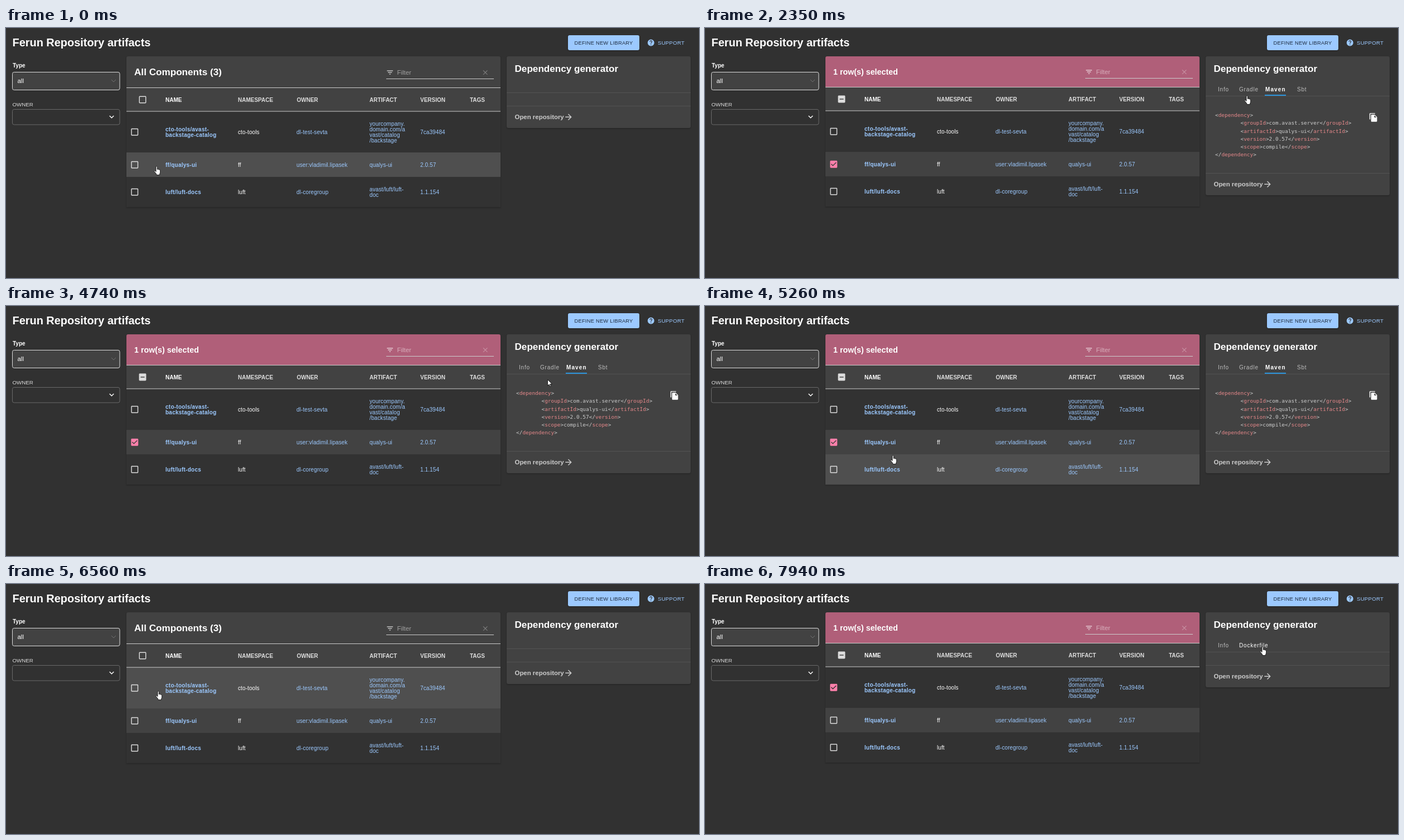
An HTML page for the animation above (8 s loop, 1243x450 px).

```html
<!DOCTYPE html>
<html lang="en">
<head>
<meta charset="utf-8">
<title>Repository artifacts</title>
<style>
  html, body { margin: 0; width: 100%; height: 100%; overflow: hidden; background: #313131; }
  svg { display: block; width: 1243px; height: 450px; }
  text { font: 10px "Liberation Sans", Arial, sans-serif; fill: #fff; white-space: pre; }
  .b { font-weight: 700; }
  .title { font-size: 20px; font-weight: 700; letter-spacing: -.04px; }
  .heading { font-size: 17.14px; font-weight: 700; }
  .selected { font-size: 14.29px; font-weight: 700; }
  .field { font-size: 11.43px; }
  .owner { font-size: 9.7px; fill: #ddd; }
  .button { font-size: 9.29px; letter-spacing: .26px; fill: #1d2b3c; }
  .support { font-size: 9.6px; letter-spacing: .26px; fill: #9cc9ff; }
  .head { font-weight: 700; fill: #ddd; }
  .cell { letter-spacing: .1px; }
  .link { letter-spacing: .1px; fill: #9cc9ff; }
  .name { letter-spacing: .25px; font-weight: 700; fill: #9cc9ff; }
  .tab { letter-spacing: .8px; fill: #bdbdbd; }
  .tab.hot { fill: #fff; }
  .tab.on { letter-spacing: 1.1px; font-weight: 700; fill: #fff; }
  .repo { font-size: 11.43px; font-weight: 700; fill: #ccc; }
  .code { font: 9.45px "DejaVu Sans Mono", monospace; fill: #ccc; }
  .tag { fill: #e5888a; }
  .str { fill: #7ec699; }
  .card { filter: drop-shadow(0 1px 1px rgba(0, 0, 0, .3)); }
</style>
</head>
<body>
<svg id="stage" viewBox="0 0 1243 450"></svg>
<script>
const LOOP = 8000;
const BOX = 'M19 3H5c-1.1 0-2 .9-2 2v14c0 1.1.9 2 2 2h14c1.1 0 2-.9 2-2V5c0-1.1-.9-2-2-2z';
const ICON = {
  empty: BOX + 'M19 5v14H5V5z',
  some: BOX + 'M17 13H7v-2h10z',
  checked: BOX + 'M10 17l-5-5 1.4-1.4L10 14.2l7.6-7.6L19 8z',
  filter: 'M10 18h4v-2h-4zM3 6v2h18V6zm3 7h12v-2H6z',
  clear: 'M19 6.4L17.6 5 12 10.6 6.4 5 5 6.4 10.6 12 5 17.6 6.4 19 12 13.4 17.6 19 19 17.6 13.4 12z',
  arrow: 'M12 4l-1.4 1.4L16.2 11H4v2h12.2l-5.6 5.6L12 20l8-8z',
  copy: 'M16 1H4c-1.1 0-2 .9-2 2v14h2V3h12zm-1 4l6 6v10c0 1.1-.9 2-2 2H8c-1.1 0-2-.9-2-2V7c0-1.1.9-2 2-2zm-1 7h5.5L14 6.5z',
  expand: 'M16.6 8.6L12 13.2 7.4 8.6 6 10l6 6 6-6z',
  help: 'M12 2a10 10 0 1 0 0 20a10 10 0 1 0 0-20zM13 19h-2v-2h2zm2.1-7.7l-.9.9C13.5 12.9 13 13.5 13 15h-2v-.5c0-1.1.5-2.1 1.2-2.8l1.2-1.3c.4-.4.6-.9.6-1.4a2 2 0 0 0-4 0H8a4 4 0 0 1 8 0c0 .9-.4 1.7-.9 2.3z'
};
const POINTER = {
  hand: 'M3 9.5V1a1.2 1.2 0 0 1 2.4 0V5.5q1-.9 2 .2q1-.5 1.7.5q1.5-.3 1.5 1.3V10.5q0 1.8-1 3V15.5H3.8V13.8L0 9.3q-.6-1.2.6-1.6q1 0 2.4 1.8Z',
  arrow: 'M.5.5V11.5L3.1 9.1L4.9 13.1L6.5 12.4L4.8 8.5H8.5Z'
};

const COLUMNS = [['NAME', 286], ['NAMESPACE', 416], ['OWNER', 521.5], ['ARTIFACT', 652], ['VERSION', 743], ['TAGS', 832]];
const ROWS = [
  { top: 150, h: 74, fill: '#323232', name: ['cto-tools/avast-', 'backstage-catalog'], space: 'cto-tools', owner: 'dl-test-sevta',
    artifact: ['yourcompany.', 'domain.com/a', 'vast/catalog', '/backstage'], version: '7ca39484' },
  { top: 224, h: 44, fill: '#424242', name: ['ff/qualys-ui'], space: 'ff', owner: 'user:vladimil.lipasek',
    artifact: ['qualys-ui'], version: '2.0.57' },
  { top: 268, h: 54.6, fill: '#323232', name: ['luft/luft-docs'], space: 'luft', owner: 'dl-coregroup',
    artifact: ['avast/luft/luft-', 'doc'], version: '1.1.154' }
];
const MAVEN = ['<dependency>', '        <groupId>com.avast.server</groupId>', '        <artifactId>qualys-ui</artifactId>',
  '        <version>2.0.57</version>', '        <scope>compile</scope>', '</dependency>'];
const GRADLE = ['compile "com.avast.server:qualys-ui:2.0.57"'];
const TABS = {
  library: [['Info', 920], ['Gradle', 958], ['Maven', 1005], ['Sbt', 1062]],
  image: [['Info', 920], ['Dockerfile', 958]]
};

// Time, pointer position, then whatever else changes at that moment.
const STEPS = [
  [0, 266, 249, { pointer: 'hand', hover: 1, picked: -1, tabs: '', tab: '', hot: '', bar: 0 }],
  [530, 266, 249, { picked: 1 }],
  [660, 266, 249, { tabs: 'library', tab: 'Maven', bar: 1004 }],
  [790, 268, 250],
  [920, 330, 258],
  [1050, 466, 270],
  [1180, 790, 307, { hover: 2 }],
  [1310, 1008, 330, { hover: -1, pointer: 'arrow' }],
  [1440, 1017, 346],
  [1570, 1018, 345],
  [1700, 1015, 330],
  [1830, 1008, 300],
  [1960, 996, 260],
  [2090, 982, 208],
  [2220, 971, 163],
  [2350, 968, 122, { pointer: 'hand' }],
  [2480, 966, 113, { hot: 'Gradle' }],
  [2610, 966, 113, { tab: 'Gradle', bar: 980 }],
  [2740, 966, 113, { bar: 957 }],
  [3400, 976, 112],
  [3530, 1000, 111, { hot: '' }],
  [3660, 1010, 111, { hot: 'Maven' }],
  [3800, 1012, 112],
  [4080, 1012, 112, { tab: 'Maven', bar: 975 }],
  [4210, 1012, 112, { bar: 1004 }],
  [4740, 971, 132, { pointer: 'arrow', hot: '' }],
  [4870, 850, 177, { pointer: 'hand', hover: 0 }],
  [5000, 640, 230, { hover: 1 }],
  [5130, 455, 262],
  [5260, 333, 269, { hover: 2 }],
  [5400, 262, 263, { hover: 1 }],
  [5520, 247, 260],
  [5770, 246, 259],
  [5910, 246, 259, { picked: -1, tabs: '', tab: '' }],
  [6040, 247, 256],
  [6170, 252, 240],
  [6300, 262, 214, { hover: 0 }],
  [6430, 268, 197],
  [6560, 269, 193],
  [7010, 269, 193, { picked: 0 }],
  [7140, 269, 193, { tabs: 'image' }],
  [7410, 390, 203],
  [7540, 710, 165],
  [7670, 955, 126, { hover: -1 }],
  [7800, 995, 116, { hot: 'Dockerfile' }],
  [7940, 996, 113]
];
const states = [];
for (const [time, x, y, change] of STEPS) states.push({ ...states.at(-1), ...change, time, x, y });

const text = (x, y, cls, body) => `<text x="${x}" y="${y}" class="${cls}">${body}</text>`;
const rect = (x, y, w, h, fill, extra = '') => `<rect x="${x}" y="${y}" width="${w}" height="${h}" fill="${fill}" ${extra}/>`;
const icon = (name, x, y, fill, scale = .714) =>
  `<path d="${ICON[name]}" fill="${fill}" fill-rule="evenodd" transform="translate(${x} ${y}) scale(${scale}) translate(-12 -12)"/>`;
const lines = (list, x, mid, cls) =>
  list.map((line, i) => text(x, mid + 4 + (i - (list.length - 1) / 2) * 10, cls, line)).join('');
const escape = s => s.replace(/</g, '&lt;').replace(/>/g, '&gt;');
const paint = s => escape(s)
  .replace(/(&lt;\/?)(\w+)/g, '$1<tspan class="tag">$2</tspan>')
  .replace(/^(compile )(".*")/, '$1<tspan class="str">$2</tspan>');

const frame = text(11.5, 33, 'title', 'Ferun Repository artifacts')
  + rect(1008, 13, 128, 27, '#9cc9ff', 'rx="3" class="card"')
  + text(1019.5, 30, 'button', 'DEFINE NEW LIBRARY')
  + icon('help', 1156.8, 26.5, '#9cc9ff', .595)
  + text(1169, 30, 'support', 'SUPPORT')
  + text(12, 71, 'b', 'Type')
  + rect(11.5, 79.5, 192.5, 32, '#424242', 'rx="3" stroke="#ddd"')
  + text(20.5, 99, 'field', 'all')
  + '<path d="M189 93l4 4 4-4" fill="none" stroke="#707070"/>'
  + text(11.5, 141, 'owner', 'OWNER')
  + rect(11.5, 146.5, 192.5, 27.5, 'none', 'rx="3" stroke="#6a6a6a"')
  + icon('expand', 189.5, 160, '#fff');

function row(r, i, s) {
  const mid = r.top + (i === 2 ? 27 : r.h / 2);
  const on = s.picked === i;
  return rect(216, r.top, 671, r.h, s.hover === i ? '#4f4f4f' : r.fill)
    + icon(on ? 'checked' : 'empty', 230.8, mid + .3, on ? '#ff80ab' : '#ddd')
    + lines(r.name, 286, mid, 'name')
    + text(416, mid + 4, 'cell', r.space)
    + text(521, mid + 4, 'link', r.owner)
    + lines(r.artifact, 652, mid, 'link')
    + text(743, mid + 4, 'link', r.version);
}

function table(s) {
  const any = s.picked >= 0;
  return `<g class="card">`
    + rect(216, 51, 671, 90, any ? '#b05f79' : '#424242', 'rx="3"')
    + (any ? text(230, 84, 'selected', '1 row(s) selected') : text(230, 85, 'heading', 'All Components (3)'))
    + `<g transform="translate(0 ${any ? -1 : 0})">`
    + icon('filter', 688.7, 80, '#fff', .595)
    + `<text x="701.5" y="84" class="field" fill-opacity=".5">Filter</text>`
    + icon('clear', 859.7, 80.2, 'rgba(255,255,255,.3)', .595)
    + rect(682, 91, 193, 1, '#ccc')
    + rect(216, 108, 671, 42, '#424242')
    + rect(216, 107, 671, 1, '#ccc')
    + icon(any ? 'some' : 'empty', 245, 129, '#ddd')
    + COLUMNS.map(([label, x], i) => text(x, 133, i ? 'head' : 'b', label)).join('')
    + ROWS.map((r, i) => row(r, i, s)).join('')
    + rect(216, 149.5, 671, 1, '#ccc')
    + '</g></g>';
}

function panel(s) {
  const code = s.tab === 'Maven' ? MAVEN : s.tab === 'Gradle' ? GRADLE : [];
  const base = s.tabs ? 122 : 116;
  const foot = Math.round(code.length ? 175.5 + code.length * 14.25 : base + 24);
  const tabs = (TABS[s.tabs] || []).map(([label, x]) =>
    text(x, 114, 'tab' + (label === s.tab ? ' on' : label === s.hot ? ' hot' : ''), label)).join('');
  return rect(898, 51, 330, foot - 11, '#424242', 'rx="3" class="card"')
    + text(912.5, 79, 'heading', 'Dependency generator')
    + tabs
    + rect(898, base, 330, 1, '#535353')
    + (s.tab ? rect(s.bar, 120, 38, 2, '#2a94dc') : '')
    + code.map((line, i) => text(915, Math.round(160 + i * 14.25), 'code', paint(line))).join('')
    + (code.length ? icon('copy', 1199, 161, '#fff') : '')
    + rect(898, foot, 330, 1, '#535353')
    + text(912.5, foot + 24, 'repo', 'Open repository')
    + icon('arrow', 1009, foot + 20.3, '#ccc');
}

const pointer = s =>
  `<path d="${POINTER[s.pointer]}" fill="#fff" stroke="#111" stroke-width=".9" transform="translate(${s.x} ${s.y})"/>`;

const stage = document.getElementById('stage');
let shown;
function draw() {
  const now = performance.now() % LOOP;
  const state = states.findLast(s => s.time <= now);
  if (state !== shown) {
    stage.innerHTML = frame + table(state) + panel(state) + pointer(state);
    shown = state;
  }
  requestAnimationFrame(draw);
}
draw();
</script>
</body>
</html>
```
